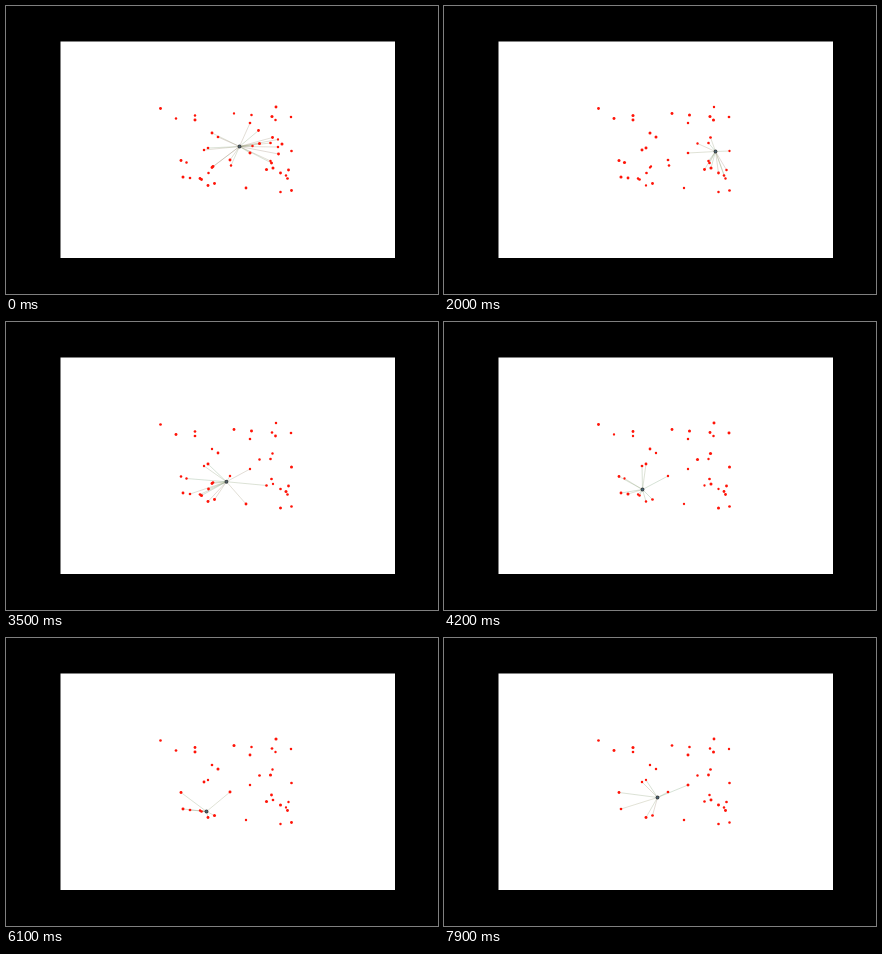
Animation of 432 by 288 pixels, one loop 8 s. Source, as an HTML page with a canvas:

```html
<!DOCTYPE html>
<html lang="en">
<head>
<meta charset="utf-8">
<title>Dot collector</title>
<style>
html, body { margin: 0; width: 100%; height: 100%; overflow: hidden; background: #000; }
canvas { display: block; }
</style>
</head>
<body>
<canvas id="stage" width="432" height="288"></canvas>
<script>
const ctx = document.getElementById('stage').getContext('2d');
const LOOP = 8000, STEP = 100;
const REACH_X = 41, REACH_Y = 28.4;

// The hub collects the first dots in this order; the others stay.
const dots = [
  [246.5, 140], [252.5, 124.5], [272, 133.5], [276, 138], [272, 141],
  [272.5, 148], [264.5, 155], [225, 159.5], [207, 160.5], [206, 161.5],
  [202.5, 167], [180.5, 156.5], [195.5, 173.5], [194, 172.5], [184, 172],
  [154.5, 102.5], [170, 112.5], [189, 109.5], [189, 114], [206, 127],
  [212, 131], [228, 107.5], [245.5, 109], [244, 117], [270, 101],
  [266, 110.5], [269.5, 114], [285, 111], [266.5, 131.5], [253.5, 137.5],
  [264.5, 137], [285.5, 145], [244, 147], [265.5, 157], [267, 162],
  [260.5, 163.5], [282.5, 164], [274.5, 167], [280, 169.5], [281.5, 172.5],
  [274.5, 186], [285.5, 184.5], [240, 182], [198, 144], [202, 142],
  [224, 154], [175, 154.5], [177, 171], [202, 179.5], [208.5, 177.5]
];

// Where the hub is at a few key times, and how many dots it has by then
const stops = [
  { t: 0, at: [233.5, 140.5], got: 0 },
  { t: 900, at: [263.5, 123.5], got: 2 },
  { t: 2000, at: [271.5, 145.5], got: 6 },
  { t: 2800, at: [245.5, 163.5], got: 7 },
  { t: 4200, at: [198.5, 167.5], got: 11 },
  { t: 6100, at: [200.5, 173.5], got: 12 },
  { t: 7900, at: [213.5, 159.5], got: 15 }
];

const dist = (a, b) => Math.hypot(a[0] - b[0], a[1] - b[1]);

// Visit the dots between two stops at even speed.
function planRoute() {
  const route = [{ t: 0, at: stops[0].at, got: 0 }];
  for (let i = 1; i < stops.length; i++) {
    const from = stops[i - 1], to = stops[i];
    const pts = [from.at, ...dots.slice(from.got, to.got), to.at];
    const legs = pts.slice(1).map((p, k) => dist(p, pts[k]));
    const total = legs.reduce((a, b) => a + b);
    let done = 0;
    legs.forEach((leg, k) => {
      done += leg;
      route.push({
        t: from.t + (to.t - from.t) * done / total,
        at: pts[k + 1],
        got: Math.min(from.got + k + 1, to.got)
      });
    });
  }
  return route;
}
const route = planRoute();

function hubAt(t) {
  let i = 0;
  while (i < route.length - 1 && route[i + 1].t <= t) i++;
  const a = route[i], b = route[i + 1] || a;
  const k = b === a ? 0 : (t - a.t) / (b.t - a.t);
  return {
    x: a.at[0] + (b.at[0] - a.at[0]) * k,
    y: a.at[1] + (b.at[1] - a.at[1]) * k,
    got: a.got
  };
}

function rand(a, b) {
  const v = Math.sin(a * 127.1 + b * 311.7 + 17.3) * 43758.5453;
  return v - Math.floor(v);
}

function disc(x, y, r, color) {
  ctx.fillStyle = color;
  ctx.beginPath();
  ctx.arc(x, y, r, 0, Math.PI * 2);
  ctx.fill();
}

function line(x0, y0, x1, y1, color) {
  ctx.strokeStyle = color;
  ctx.beginPath();
  ctx.moveTo(x0, y0);
  ctx.lineTo(x1, y1);
  ctx.stroke();
}

function draw(time) {
  const hub = hubAt(Math.floor(time / STEP) * STEP);
  const left = dots.map(([x, y], id) => ({ x, y, id })).slice(hub.got);

  ctx.fillStyle = '#000';
  ctx.fillRect(0, 0, 432, 288);
  ctx.fillStyle = '#fff';
  ctx.fillRect(54.5, 35.5, 334.5, 216.5);

  ctx.lineWidth = 0.5;
  for (const { x, y, id } of left) {
    if (Math.hypot((x - hub.x) / REACH_X, (y - hub.y) / REACH_Y) < 1) {
      const hue = 20 + 110 * rand(hub.got, id + 60);
      line(hub.x, hub.y, x, y, `hsla(${hue},18%,50%,0.55)`);
    }
  }

  // Sizes are drawn anew after each collected dot.
  for (const { x, y, id } of left) {
    disc(x, y, 1.15 + 0.4 * rand(hub.got, id), '#ff1408');
  }

  disc(hub.x, hub.y, 1.9, '#404346');
  disc(hub.x, hub.y, 1, `hsl(200,${10 + 25 * rand(hub.got, 4)}%,38%)`);
}

const start = performance.now();
function tick() {
  draw((performance.now() - start) % LOOP);
  requestAnimationFrame(tick);
}
tick();
</script>
</body>
</html>
```
